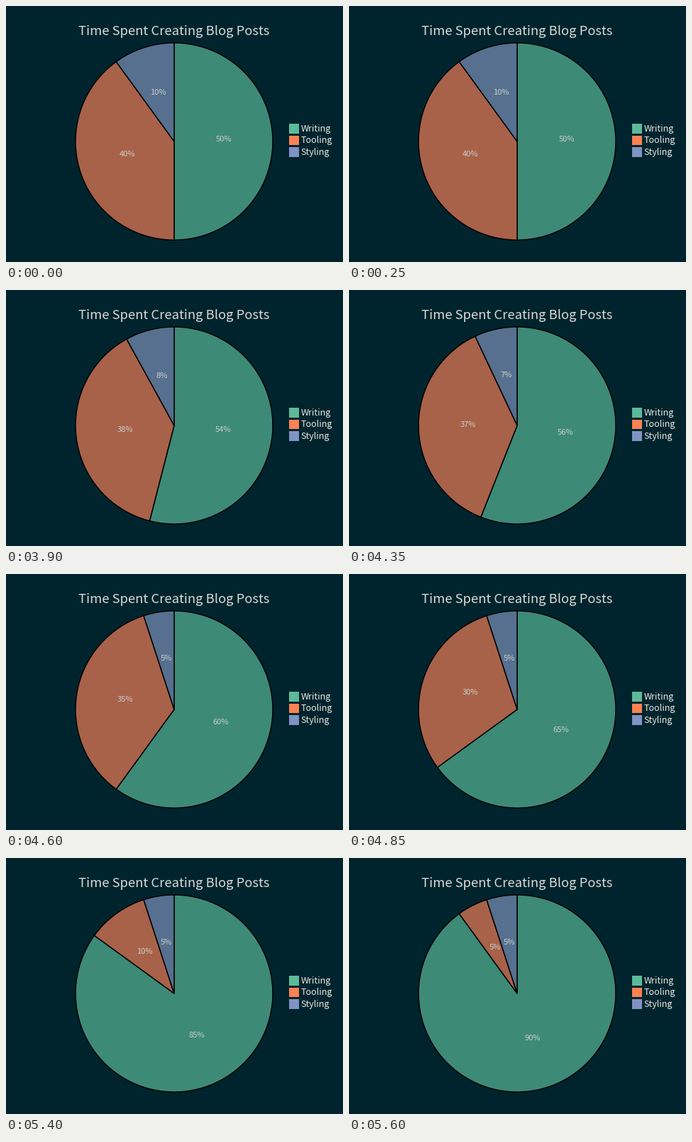
These frames come from a looping animation (475 by 361 pixels, 8000 ms). A matplotlib script:

```python
import matplotlib.pyplot as plt
import numpy as np
from matplotlib.animation import FuncAnimation
from matplotlib.patches import Polygon, Rectangle

W, H, DPI = 475, 361, 100
STEP = 50
LOOP = 8000
CX, CY, R = 237.0, 191.0, 139.0
S = R / 185  # chart units to pixels

BG = "#00242d"
NAMES = ["Writing", "Tooling", "Styling"]
FILLS = ["#3d8a77", "#a8624a", "#57708f"]
SWATCHES = ["#5cba99", "#fc8153", "#8093c4"]

# moments at which the values are edited
EDITS = [3400, 3900, 4350, 4450, 4600, 4850, 4950, 5100, 5250, 5400, 5600]

plt.rcParams["font.family"] = "Noto Sans CJK JP"


def shares(t):
    """Five small steps of 2 %, then six of 5 % taken from tooling alone."""
    n = sum(t >= e for e in EDITS)
    small, big = min(n, 5), max(n - 5, 0)
    return (50 + 2 * small + 5 * big, 40 - small - 5 * big, 10 - small)


def on_circle(share, radius):
    a = 2 * np.pi * np.asarray(share) / 100
    return CX + radius * np.sin(a), CY - radius * np.cos(a)


def sector(start, end):
    x, y = on_circle(np.linspace(start, end, 121), R)
    return np.column_stack([np.append(x, CX), np.append(y, CY)])


def label(x, y, s, px, color, ha="center"):
    return ax.text(x, y, s, size=px * 72 / DPI, color=color,
                   ha=ha, va="baseline")


fig = plt.figure(figsize=(W / DPI, H / DPI), dpi=DPI, facecolor=BG)
ax = fig.add_axes([0, 0, 1, 1])
ax.set_xlim(0, W)
ax.set_ylim(H, 0)
ax.axis("off")

label(CX, CY - 200 * S, "Time Spent Creating Blog Posts", 18.4, "#d8dad6")

slices, percents = [], []
for i, name in enumerate(NAMES):
    slices.append(ax.add_patch(Polygon(
        [(CX, CY), (CX, CY - R), (CX + 1, CY - R)], facecolor=FILLS[i],
        edgecolor="black", lw=2 * S * 72 / DPI, joinstyle="miter")))
    percents.append(label(CX, CY, "", 11.2, "#c9cec9"))
    x, y = CX + 216 * S, CY + (22 * i - 33) * S
    ax.add_patch(Rectangle((x, y), 18 * S, 18 * S, color=SWATCHES[i], lw=0))
    label(x + 22 * S, y + 14 * S, name, 12.6, "#e6e8e3", ha="left")


def draw(frame):
    start = 0
    for part, text, share in zip(slices, percents, shares(frame * STEP)):
        part.set_xy(sector(start, start + share))
        text.set_position(on_circle(start + share / 2, R / 2))
        text.set_text(f"{share}%")
        start += share
    return slices + percents


anim = FuncAnimation(fig, draw, frames=LOOP // STEP, interval=STEP,
                     repeat=True, repeat_delay=0)
plt.show()
```
